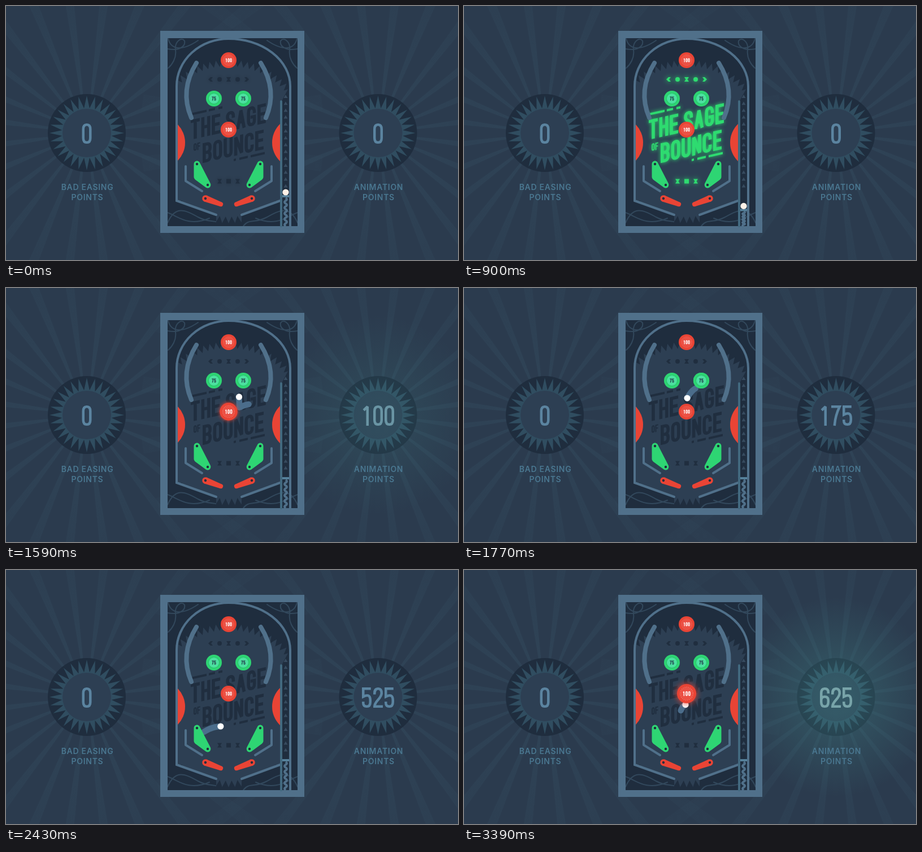
These frames come from a looping animation (800 by 450 pixels, 3.42 s). An HTML page with a canvas:

```html
<!DOCTYPE html>
<html lang="en">
<head>
<meta charset="utf-8">
<title>Pinball</title>
<style>
html, body { margin: 0; width: 100%; height: 100%; overflow: hidden; background: #2b3b4e; }
canvas { display: block; width: 800px; height: 450px; }
</style>
</head>
<body>
<canvas id="stage" width="800" height="450"></canvas>
<script>
const ctx = document.getElementById('stage').getContext('2d');
const LOOP = 3420, MID = 394, TAU = Math.PI * 2;
const BG = '#2b3b4e', DARK = '#1f2d3e', FIELD = '#2d3f53', STEEL = '#50708a',
      RED = '#e94435', GREEN = '#2ed573', LIT = [46, 219, 112], UNLIT = [32, 46, 63];

// Condensed lettering, drawn as strokes in a 10 x 20 cell
const ROUND = 'M0 5Q0 0 5 0T10 5V15Q10 20 5 20T0 15Z';
const LETTERS = {
  T: 'M0 0H10M5 0V20', H: 'M0 0V20M10 0V20M0 10H10', E: 'M9 0H0V20H9M0 10H8',
  F: 'M9 0H0V20M0 10H8', A: 'M0 20L5 0L10 20M2 14H8', N: 'M0 20V0L10 20V0',
  U: 'M0 0V15Q0 20 5 20T10 15V0', C: 'M10 5Q10 0 5 0T0 5V15Q0 20 5 20T10 15',
  G: 'M10 5Q10 0 5 0T0 5V15Q0 20 5 20T10 15V11H6', O: ROUND,
  S: 'M10 5Q10 0 5 0T0 5C0 10 10 10 10 15Q10 20 5 20T0 15',
  B: 'M0 0V20H5Q10 20 10 15T5 10H0H5Q10 10 10 5T5 0Z'
};
const DIGITS = {
  0: ROUND, 1: 'M2 3L6 0V20', 2: 'M0 5Q0 0 5 0T10 5C10 11 0 14 0 20H10',
  3: 'M0 4Q0 0 5 0T10 5T5 10Q10 10 10 15T5 20T0 16', 4: 'M8 20V0L0 14H10',
  5: 'M9 0H0V9Q10 5 10 13V15Q10 20 5 20T0 16',
  6: 'M10 4Q10 0 5 0T0 5V15Q0 20 5 20T10 15V13Q10 9 5 9T0 13', 7: 'M0 0H10Q4 10 3 20'
};

const BUMPERS = [
  { x: 394, y: 96, points: 100 }, { x: 394, y: 219, points: 100 },
  { x: 368, y: 164, points: 75 }, { x: 420, y: 164, points: 75 }
];
// time, bumper index
const HITS = [[1530, 1], [1655, 3], [1785, 1], [1890, 2], [1980, 3], [2080, 1], [3375, 1]];
// time, x, y, height of the arc leading to this point
const PATH = [
  [1080, 495, 361, 0], [1150, 493, 136, 0], [1195, 480, 128, 8], [1290, 479, 140, 2],
  [1400, 468, 220, -8], [1530, 413, 212, 10], [1655, 412, 177, 2], [1785, 393, 199, 4],
  [1890, 376, 182, 4], [1980, 408, 180, 5], [2080, 406, 203, 0], [2230, 323, 240, 18],
  [2330, 350, 287, 4], [2560, 418, 290, 11.5], [2700, 424, 334, 6], [2990, 360, 334, 66],
  [3110, 366, 336, 0], [3375, 392, 239, 24], [3420, 392, 238, 0]
];

const clamp = v => Math.max(0, Math.min(1, v));
const ramp = (t, a, b) => clamp((t - a) / (b - a));
const smooth = u => u * u * (3 - 2 * u);
const pulse = (t, start, length) => t < start ? 0 : clamp(1 - (t - start) / length);
const mix = (a, b, u) => `rgb(${a.map((v, i) => Math.round(v + (b[i] - v) * u))})`;

function disc(x, y, r, color) {
  ctx.fillStyle = color;
  ctx.beginPath();
  ctx.arc(x, y, r, 0, TAU);
  ctx.fill();
}

function poly(points, color) {
  ctx.fillStyle = color;
  ctx.beginPath();
  points.forEach(p => ctx.lineTo(...p));
  ctx.closePath();
  ctx.fill();
}

function line(points, width, color, cap = 'round') {
  ctx.lineWidth = width;
  ctx.strokeStyle = color;
  ctx.lineCap = cap;
  ctx.lineJoin = 'round';
  ctx.beginPath();
  points.forEach(p => ctx.lineTo(...p));
  ctx.stroke();
}

function curve(d, width, color) {
  ctx.lineWidth = width;
  ctx.strokeStyle = color;
  ctx.lineCap = 'round';
  ctx.stroke(new Path2D(d));
}

function star(x, y, outer, inner, count, color) {
  const points = [];
  for (let i = 0; i < count * 2; i++) {
    const r = i % 2 ? inner : outer, a = i * Math.PI / count - Math.PI / 2;
    points.push([x + r * Math.cos(a), y + r * Math.sin(a)]);
  }
  poly(points, color);
}

// Letters sit on the baseline y; width and height include the stroke
function letter(text, x, y, { width, height, weight, gap, color, centered }) {
  const chars = [...String(text)], run = new Path2D(), half = weight / 2;
  if (centered) x -= (chars.length * (width + gap) - gap) / 2;
  for (const char of chars) {
    if (char === ' ') { x += width * .4; continue; }
    const cell = new DOMMatrix([(width - weight) / 10, 0, 0, (height - weight) / 20, x + half, y - height + half]);
    run.addPath(new Path2D(LETTERS[char] || DIGITS[char]), cell);
    x += width + gap;
  }
  ctx.lineWidth = weight;
  ctx.strokeStyle = color;
  ctx.lineCap = 'square';
  ctx.lineJoin = 'miter';
  ctx.miterLimit = 2;
  ctx.stroke(run);
}

function mirrored(draw) {
  draw(-1);
  ctx.save();
  ctx.translate(MID * 2, 0);
  ctx.scale(-1, 1);
  draw(1);
  ctx.restore();
}

function rays(x, y) {
  const fade = ctx.createRadialGradient(x, y, 60, x, y, 330);
  fade.addColorStop(0, 'rgba(54,82,101,.34)');
  fade.addColorStop(1, 'rgba(54,82,101,.1)');
  for (let i = 0; i < 24; i++) {
    const a = (i + .5) * TAU / 24, w = .033;
    poly([[x, y], [x + 420 * Math.cos(a - w), y + 420 * Math.sin(a - w)],
      [x + 420 * Math.cos(a + w), y + 420 * Math.sin(a + w)]], fade);
  }
}

function dial(x, score, label, flash) {
  const y = 225;
  disc(x, y, 69, DARK);
  star(x, y, 66, 44, 28, '#304d60');
  disc(x, y, 43, FIELD);
  if (flash) {
    const glow = ctx.createRadialGradient(x, y, 30, x, y, 177);
    glow.addColorStop(0, `rgba(66,139,140,${.4 * flash})`);
    glow.addColorStop(1, 'rgba(66,139,140,0)');
    disc(x, y, 177, glow);
  }
  letter(score, x, 244, {
    width: 17, height: 36, weight: 4.5, gap: 3, centered: true,
    color: mix([91, 132, 160], [125, 170, 170], flash)
  });
  ctx.font = '600 14px Inter, sans-serif';
  ctx.letterSpacing = '0.7px';
  ctx.textAlign = 'center';
  ctx.fillStyle = '#4a7790';
  [label, 'POINTS'].forEach((text, i) => ctx.fillText(text, x + 1, 326 + i * 18));
}

function cabinet() {
  ctx.fillStyle = STEEL;
  ctx.fillRect(273, 44, 255, 358);
  ctx.fillStyle = DARK;
  ctx.fillRect(286, 57, 230, 333);
  ctx.save();
  ctx.beginPath();
  ctx.rect(286, 57, 230, 333);
  ctx.clip();
  for (const flip of [0, 1]) {
    ctx.save();
    if (flip) { ctx.translate(802, 0); ctx.scale(-1, 1); }
    curve('M287 58C292 78 312 80 340 61M286 76C306 80 318 72 316 62C312 54 298 62 300 78C302 92 294 104 287 110', 2, '#32485c');
    curve('M286 384C300 352 318 362 340 374S372 376 382 390M286 366C304 372 322 392 360 376', 2, '#32485c');
    ctx.restore();
  }
  ctx.restore();

  ctx.save();
  ctx.clip(new Path2D('M303 142A91 83 0 0 1 394 59A108 83 0 0 1 502 142L487 170V345L417 371V390H372V371L303 345Z'));
  ctx.fillStyle = DARK;
  ctx.fillRect(300, 57, 204, 333);
  star(MID, 240, 145, 133, 80, FIELD);
  ctx.restore();

  curve('M372 370L302 345V142A92 84 0 0 1 394 58A109 84 0 0 1 503 142V390', 4, STEEL);
  line([[417, 370], [485, 345]], 4, STEEL);
  line([[487, 169], [487, 390]], 4, '#42697f');
}

function rails() {
  mirrored(() => {
    curve('M337 101Q307 149 328 198', 8, STEEL);
    line([[318, 284], [318, 310], [347, 328]], 4, STEEL);
  });
}

function glyph(kind, x, y) {
  ctx.beginPath();
  if (kind === 'dot') ctx.arc(x, y, 4, 0, TAU);
  if (kind === 'square') ctx.rect(x - 4, y - 4, 8, 8);
  if (kind === 'glass') {
    [[-4, -4], [4, -4], [1.5, 0], [4, 4], [-4, 4], [-1.5, 0]].forEach(p => ctx.lineTo(x + p[0], y + p[1]));
  }
  if (kind === 'left' || kind === 'right') {
    const s = kind === 'left' ? 1 : -1;
    [[-4, 0], [0, -4], [4, -4], [1, 0], [4, 4], [0, 4]].forEach(p => ctx.lineTo(x + s * p[0], y + p[1]));
  }
  ctx.fill();
}

function lamps(t) {
  const on = smooth(ramp(t, 60, 330)) * (1 - smooth(ramp(t, 1080, 1480)));
  const halo = 1 - ramp(t, 1080, 1270);
  ctx.save();
  ctx.fillStyle = mix(UNLIT, LIT, on);
  ctx.shadowColor = ctx.fillStyle;
  ctx.shadowBlur = 9 * halo;
  ['left', 'dot', 'glass', 'dot', 'right'].forEach((kind, i) => glyph(kind, 362 + i * 16, 130));
  ['glass', 'square', 'glass'].forEach((kind, i) => glyph(kind, 378 + i * 16, 310.5));
  ctx.restore();
}

function title(t) {
  const on = smooth(ramp(t, 450, 660)) * (1 - smooth(ramp(t, 1080, 1450)));
  const color = mix(UNLIT, LIT, on);
  const big = { width: 16, height: 35, weight: 5.6, gap: 2.6, color };
  ctx.save();
  ctx.shadowColor = color;
  ctx.shadowBlur = t < 1200 ? 7 * on : 0;
  ctx.transform(1, -.225, 0, 1, 327, 237);
  letter('THE SAGE', 0, 0, big);
  letter('BOUNCE', 21, 46, big);
  letter('OF', 5, 21, { width: 5.5, height: 13, weight: 2, gap: 1, color });
  [[2, 28, -45], [32, 43, -45], [49, 56, -45], [76, 80, 53], [86, 101, 53], [106, 131, 53]]
    .forEach(([a, b, y]) => line([[a, y], [b, y]], 4, color, 'butt'));
  ctx.restore();
}

function arrows(t) {
  const center = 240 - ((t - 390) % 930) * .6;
  const wave = t < 2600 ? [center, center - 558, center + 558] : [];
  for (let i = 0; i < 14; i++) {
    const y = 160 + i * 12.2;
    const on = Math.max(0, ...wave.map(c => clamp(1.5 - Math.abs(y - c) / 16)));
    poly([[495, y - 3], [498.5, y + 3], [491.5, y + 3]], mix([55, 75, 95], LIT, on));
  }
}

function pull(t) {
  return t < 1080 ? 31 * smooth(ramp(t, 550, 1050)) : 31 * (1 - ramp(t, 1080, 1110));
}

function plunger(t) {
  const top = 335 + pull(t), spring = [];
  for (let i = 0; i <= 60; i++) {
    spring.push([495 + 2 * Math.sin(i / 60 * TAU * 5), top + 5 + (385 - top) * i / 60]);
  }
  line(spring, 4, STEEL, 'butt');
  line([[489, top + 2], [501, top + 2]], 4, '#55809a', 'butt');
}

function ballAt(t) {
  if (t < 1080) return [495, 330 + pull(t)];
  const i = PATH.findIndex(p => p[0] > t);
  const [t0, x0, y0] = PATH[i - 1], [t1, x1, y1, arc] = PATH[i];
  const u = (t - t0) / (t1 - t0);
  return [x0 + (x1 - x0) * u, y0 + (y1 - y0) * u - 4 * arc * u * (1 - u)];
}

function ball(t) {
  const [x, y] = ballAt(t);
  if (t > 1080) {
    const trail = [];
    for (let age = 100; age >= 0; age -= 5) trail.push(ballAt(Math.max(1080, t - age)));
    line(trail, 10.5, '#4b6d8b');
  }
  disc(x, y, 5.6, t < 1080 ? '#fdf1e8' : '#ffffff');
}

function sideBumpers(t) {
  ctx.save();
  ctx.beginPath();
  ctx.rect(304, 200, 181, 90);
  ctx.clip();
  disc(271, 242, 46 + 3 * pulse(t, 2230, 120), RED);
  disc(517, 242, 46 + 3 * pulse(t, 1400, 120), RED);
  ctx.restore();
}

function slings() {
  mirrored(() => {
    const corners = [[338, 280], [338, 303], [357, 317]];
    poly(corners, GREEN);
    line([...corners, corners[0]], 11, GREEN);
    disc(338, 280, 2.2, DARK);
    disc(357, 317, 2.2, DARK);
  });
}

function flippers(t) {
  mirrored(side => {
    const kick = side < 0 ? pulse(t, 3110, 170) : pulse(t, 2700, 170);
    ctx.save();
    ctx.translate(353, 341);
    ctx.rotate(.36 - .8 * kick);
    poly([[0, -5.8], [29, -4], [29, 4], [0, 5.8]], RED);
    disc(0, 0, 5.8, RED);
    disc(29, 0, 4, RED);
    disc(0, 0, 2.2, DARK);
    ctx.restore();
  });
}

function bumpers(t) {
  BUMPERS.forEach(({ x, y, points }, index) => {
    const hit = Math.max(0, ...HITS.filter(h => h[1] === index).map(h => pulse(t, h[0], 120)));
    const red = points === 100, color = red ? RED : GREEN;
    ctx.save();
    ctx.translate(x, y);
    ctx.scale(1 + .25 * hit, 1 + .25 * hit);
    ctx.shadowColor = color;
    ctx.shadowBlur = 12 * hit;
    disc(0, 0, 14, color);
    ctx.shadowBlur = 0;
    disc(0, 0, 9, red ? '#ec5145' : '#4ce0a0');
    ctx.lineWidth = 1;
    ctx.lineCap = 'butt';
    ctx.setLineDash([1, 1.6]);
    ctx.strokeStyle = red ? '#f58a7d' : '#1fa765';
    ctx.beginPath();
    ctx.arc(0, 0, 9.5, 0, TAU);
    ctx.stroke();
    ctx.setLineDash([]);
    letter(points, 0, 3.5, {
      width: 3.3, height: 7, weight: 1.2, gap: .7, centered: true, color: red ? '#fff' : '#22384a'
    });
    ctx.restore();
  });
}

function draw(t) {
  const score = HITS.reduce((sum, [time, i]) => sum + (t >= time ? BUMPERS[i].points : 0), 0);
  const flash = Math.max(...HITS.map(h => pulse(t, h[0], 110)));
  ctx.fillStyle = BG;
  ctx.fillRect(0, 0, 800, 450);
  rays(143, 225);
  rays(658, 225);
  dial(143, 0, 'BAD EASING', 0);
  dial(658.5, score, 'ANIMATION', flash);
  cabinet();
  lamps(t);
  title(t);
  arrows(t);
  plunger(t);
  rails();
  ball(t);
  sideBumpers(t);
  slings();
  flippers(t);
  bumpers(t);
}

function frame(now) {
  draw(now % LOOP);
  requestAnimationFrame(frame);
}
draw(0);
requestAnimationFrame(frame);
</script>
</body>
</html>
```
